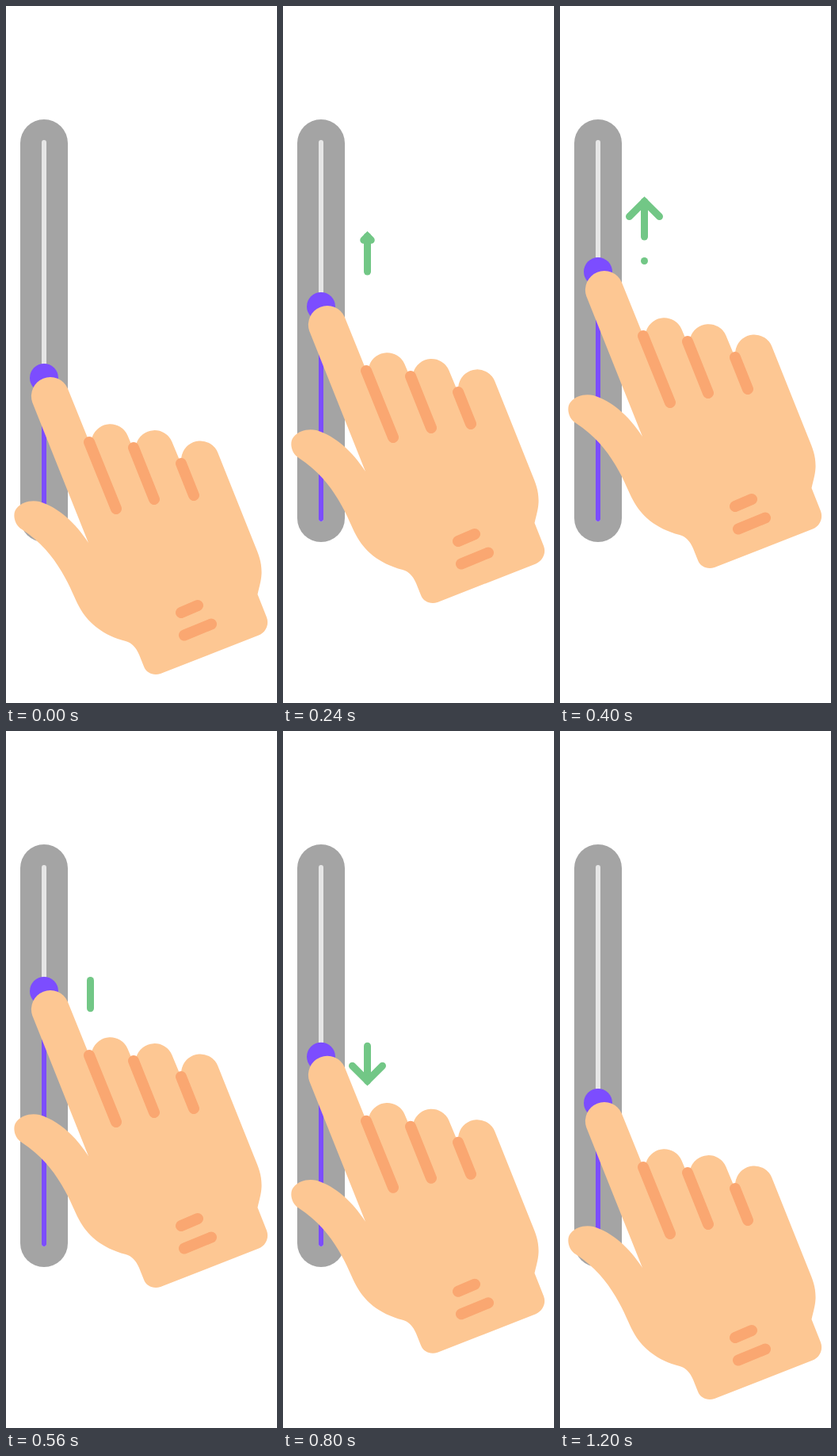
Recreate the animation shown at these times as an HTML page. Size 342 by 879 pixels, loop 1320 ms.

```html
<!DOCTYPE html>
<html lang="en">
<head>
<meta charset="utf-8">
<title>Slider gesture</title>
<style>
  html, body { margin: 0; width: 100%; height: 100%; overflow: hidden; background: #fff; }
  svg { display: block; width: 342px; height: 879px; }
  path, line { stroke-linecap: round; }
  .arrow { fill: none; stroke: #72c786; stroke-width: 9; }
  .crease { fill: none; stroke: #faa771; stroke-width: 14; }
</style>
</head>
<body>
<svg viewBox="0 0 342 879">
  <rect x="18" y="143" width="60" height="533" rx="30" fill="#a4a4a4"/>
  <path d="M48 172V647" stroke="#e6e6e6" stroke-width="6"/>
  <line id="level" x1="48" x2="48" y1="469" y2="647" stroke="#7c4dff" stroke-width="6"/>
  <g id="mover">
    <circle cx="48" cy="469" r="18" fill="#7c4dff"/>
    <path fill="#fdc793" d="M33.2 499.8A24 24 0 0 1 77.8 482.2L106 552L109 543
      A24 24 0 0 1 153.3 541.2L160 557L164.5 552
      A24 24 0 0 1 209.3 549.2L220 575L222 566
      A24 24 0 0 1 267.3 563.2L314 680
      C319 692 323 702 322.5 716C322 726 319 734 317.5 742L329 771
      C332 779 329 789 319 793.5L195 842C186 845 177 841 174 833L168 818
      C164 809 159 803 151 801C120 793 102 776 92 757
      C86 746 82 733 70 713C58 693 44 676 20 660
      C10 654 8 640 13 634C20 625 32 623 42 625C66 632 88 652 104 677Z"/>
    <path class="crease" d="M105 550L139 634M161 557L187 622M221 577L237 617M221 765L242 756M225 793.5L259 779.5"/>
    <g class="arrow" id="up"><path/><path/></g>
    <g class="arrow" id="down"><path/><path/></g>
  </g>
</svg>
<script>
const $ = id => document.getElementById(id);
const LOOP = 1320, STEP = 40, TRAVEL = 141;
const progress = (t, start, length) => Math.min(1, Math.max(0, (t - start) / length));
const easeOut = u => 1 - (1 - u ** 1.27) ** 1.9;
const easeInOut = u => (1 - Math.cos(Math.PI * u)) / 2;

// The shaft grows first, then the head opens, then everything fades.
function drawArrow(id, t, { start, tail, tip, fadeStart, fadeLength }) {
  const group = $(id), [shaft, head] = group.children;
  const x = 106.5, dir = Math.sign(tip - tail);
  const arm = 19 * easeInOut(progress(t, start + 200, 120));
  const armY = tip - dir * arm;
  const visible = t > 0 && t >= start;
  group.setAttribute('opacity', visible ? 1 - progress(t, fadeStart, fadeLength) : 0);
  shaft.setAttribute('d', `M${x} ${tail}V${tail + (tip - tail) * progress(t, start, 200)}`);
  head.setAttribute('d', arm ? `M${x - arm} ${armY}L${x} ${tip}L${x + arm} ${armY}` : '');
}

function draw(t) {
  const lift = TRAVEL * (easeOut(progress(t, 0, 480)) - easeInOut(progress(t, 600, 360)));
  $('mover').setAttribute('transform', `translate(0 ${-lift})`);
  $('level').setAttribute('y1', 469 - lift);
  drawArrow('up', t, { start: 0, tail: 425, tip: 380.5, fadeStart: 400, fadeLength: 160 });
  drawArrow('down', t, { start: 400, tail: 455.5, tip: 499.5, fadeStart: 1000, fadeLength: 200 });
}

function tick() {
  const t = performance.now() % LOOP;
  draw(Math.min(1200, Math.floor(t / STEP) * STEP));
  requestAnimationFrame(tick);
}
tick();
</script>
</body>
</html>
```
